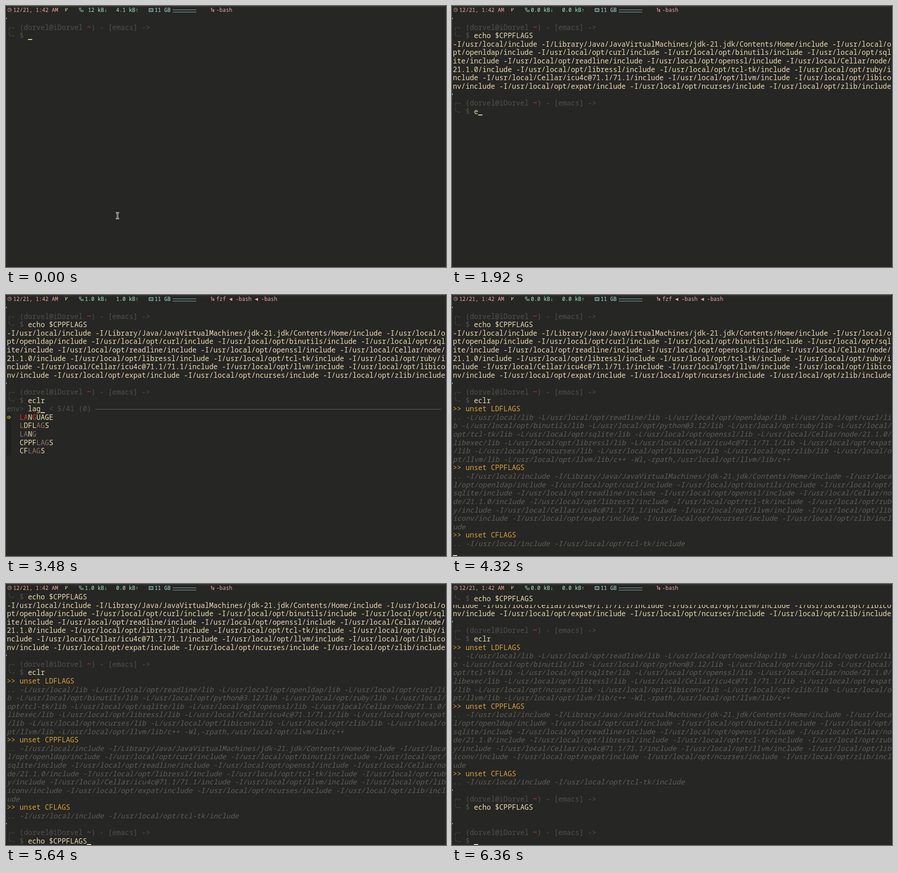
An HTML page with a canvas that plays this animation: 971x577 px, repeating every 6520 ms.

```html
<!DOCTYPE html>
<html lang="en">
<head>
<meta charset="utf-8">
<title>Terminal session</title>
<style>
  html, body { margin: 0; width: 100%; height: 100%; overflow: hidden; background: #262624; }
  canvas { display: block; }
</style>
</head>
<body>
<canvas id="stage" width="971" height="577"></canvas>
<script>
const ctx = document.getElementById('stage').getContext('2d');
const W = 971, H = 577, LOOP = 6520;
const COLS = 104, ROWS = 30, CW = 9.3, RH = 18.61, LEFT = 2, TOP = 28.4;
const MONO = '"Noto Sans Mono", "DejaVu Sans Mono", monospace';
const C = {
  bg: '#262624', edge: '#3a3a38', text: '#ebdbb2', dim: '#51504d', note: '#5f5e5a', orange: '#d8a038',
  red: '#d23a2e', hit: '#8c7468', yellow: '#c9b13c', gutter: '#20201e',
  clock: '#f2aaa4', branch: '#e9e7a4', net: '#a4efc4', mem: '#a6eae6', graph: '#86b4b4', job: '#efa3bb'
};

// ---- text content ----
const flags = (opt, dir, names) => names.split(' ').map(n =>
  opt + (n[0] === '/' ? n : '/usr/local' + (n === '.' ? '' : /^Cellar/.test(n) ? '/' + n : '/opt/' + n)) + '/' + dir
).join(' ');
const CPP = flags('-I', 'include', '. /Library/Java/JavaVirtualMachines/jdk-21.jdk/Contents/Home ' +
  'openldap curl binutils sqlite readline openssl Cellar/node/21.1.0 libressl tcl-tk ruby ' +
  'Cellar/icu4c@71.1/71.1 llvm libiconv expat ncurses zlib');
const LD = flags('-L', 'lib', '. readline openldap curl binutils python@3.12 ruby tcl-tk sqlite openssl ' +
  'Cellar/node/21.1.0/libexec libressl Cellar/icu4c@71.1/71.1 expat ncurses libiconv zlib llvm') +
  ' -L/usr/local/opt/llvm/lib/c++ -Wl,-rpath,/usr/local/opt/llvm/lib/c++';
const CF = flags('-I', 'include', '. tcl-tk');
const ECHO = 'echo $CPPFLAGS';
const VARS = ['LANGUAGE', 'LDFLAGS', 'HISTSIZE', 'LANG', 'SHELL', 'CPPFLAGS', 'JAVA_HOME',
  'CFLAGS', 'EDITOR', 'LC_ALL', 'HISTCONTROL', 'LOGNAME'];
const FOUND = { '': 41, l: 19, la: 7, lag: 5, lags: 3 };

// Last value whose start time has passed
const at = (t, steps) => steps.reduce((v, [from, val]) => t >= from ? val : v, steps[0][1]);

const firstCmd = [[0, ''], [120, ECHO]];
const secondCmd = [[0, ''], [1880, 'e'], [2000, 'ec'], [2080, 'ecl'], [2160, 'eclr']];
const lastCmd = [[0, ''], [5200, 'eclr'], [5280, ECHO]];
const query = [[0, ''], [3040, 'l'], [3280, 'la'], [3440, 'lag'], [3560, 'lags']];
const picks = [[0, 0], [3760, 1], [3880, 2], [4000, 3]];
const down = [[0, '12'], [560, '1.0'], [1240, '0.0'], [3080, '1.0'], [3880, '0.0'], [4840, '1.0'], [6280, '0.0']];
const up = [[0, '4.1'], [560, '0.0'], [3080, '1.0'], [3880, '0.0']];
const job = [[0, '-bash'], [2440, 'fzf ◄ -bash ◄ -bash'], [4760, '-bash']];

// ---- screen model: lines of [column, text, colour, italic] parts ----
function match(word, q) {
  const hits = [];
  let from = 0;
  for (const ch of q.toUpperCase()) {
    const i = word.indexOf(ch, from);
    if (i < 0) return null;
    hits.push(i);
    from = i + 1;
  }
  return hits;
}

function buildScreen(t) {
  const lines = [];
  let cursor = [0, 0];
  const add = (parts, extra) => lines.push({ parts, ...extra });
  const newline = () => { cursor = [lines.length, 0]; };
  const wrap = (s, color, italic) => {
    for (let i = 0; i < s.length; i += COLS) add([[0, s.slice(i, i + COLS), color, italic]]);
    newline();
  };
  const prompt = cmd => {
    add([], { tick: true });
    add([[1, '-', C.dim], [3, '(dorvel@iDorvel', C.dim], [19, '~', C.red],
      [20, ') - [emacs] ->', C.dim]], { corner: 1 });
    add([[1, '-', C.dim], [3, '$', C.dim], [5, cmd, C.text]], { corner: -1 });
    cursor = [lines.length - 1, 5 + cmd.length];
  };
  const unset = (name, value) => {
    add([[0, '>> unset ' + name, C.orange]]);
    wrap('.. ' + value, C.note, true);
  };
  const picker = () => {
    const q = at(t, query), n = at(t, picks), end = 5 + q.length;
    const info = `< ${FOUND[q]}/41 (${n})`;
    add([[0, 'env>', C.dim], [5, q, C.text], [end + 2, info, C.dim]], { rule: end + 3 + info.length });
    cursor = [lines.length - 1, end];
    if (t < 2400) return;
    const rows = VARS.filter(v => match(v, q)).slice(0, 9), here = Math.min(n, rows.length - 1);
    rows.forEach((word, i) => {
      const hits = match(word, q), parts = [[3, word, C.text]];
      if (i < n) parts.push([1, '>', C.orange]);
      hits.forEach(h => parts.push([3 + h, word[h], i === here ? C.red : C.hit]));
      // Plain letters and matched letters must not overlap
      parts[0][1] = [...word].map((ch, k) => hits.includes(k) ? ' ' : ch).join('');
      add(parts, { gutter: true, pointer: i === here, bar: FOUND[q] > 9 && i < 2 });
    });
  };

  prompt(at(t, firstCmd));
  if (t >= 440) newline();
  if (t >= 480) wrap(CPP, C.text);
  if (t >= 560) prompt(at(t, secondCmd));
  if (t >= 2280) newline();
  if (t >= 2320 && t < 4240) picker();
  if (t >= 4240) unset('LDFLAGS', LD);
  if (t >= 4280) unset('CPPFLAGS', CPP);
  if (t >= 4320) unset('CFLAGS', CF);
  if (t >= 4360) prompt(at(t, lastCmd));
  if (t >= 5760) { add([]); newline(); }
  if (t >= 5840) prompt('');
  return { lines, cursor, scroll: Math.max(0, cursor[0] - ROWS + 1) };
}

// ---- drawing ----
function text(s, x, y, color, size = 15.5, italic = false, align = 'left') {
  ctx.font = `${italic ? 'italic ' : ''}${size}px ${MONO}`;
  ctx.textAlign = align;
  ctx.fillStyle = color;
  ctx.fillText(s, x, y);
}

function box(x, y, w, h, color) {
  ctx.fillStyle = color;
  ctx.fillRect(x, y, w, h);
}

function stroke(d, color, width = 1) {
  ctx.strokeStyle = color;
  ctx.lineWidth = width;
  ctx.stroke(new Path2D(d));
}

function drawLine(line, y) {
  if (line.gutter) box(LEFT, y - RH / 2, CW, RH + 0.3, C.gutter);
  for (const [col, s, color, italic] of line.parts) text(s, LEFT + col * CW, y + 5.5, color, 15.5, italic);
  if (line.tick) {
    ctx.fillStyle = '#a9d6df';
    ctx.fill(new Path2D(`M0 ${y - 3}l2 2l-2 2z`));
  }
  if (line.corner) {
    const s = line.corner;
    stroke(`M11.5 ${y}H10Q7 ${y} 7 ${y + 3 * s}V${y + 8 * s}`, C.dim);
  }
  if (line.rule) box(LEFT + line.rule * CW, Math.round(y), 960 - LEFT - line.rule * CW, 1, '#605e56');
  if (line.pointer) stroke(`M2 ${y - 1.5}H8M2 ${y + 1.5}H8M6 ${y - 4}L10.5 ${y}L6 ${y + 4}`, C.yellow, 1.1);
  if (line.bar) box(964, y - RH / 2, 1, RH, C.dim);
}

function statusBar(t) {
  const label = (s, x, color, align) => text(s, x, 13, color, 11.8, false, align);
  box(0, 0, W, 19, C.bg);
  box(2, 1, W - 4, 1, C.edge);
  stroke('M12 8.5A4 4 0 1 1 4 8.5A4 4 0 1 1 12 8.5M8 6V8.5H10.5', C.clock, 0.9);
  label('12/21, 1:42 AM', 16, C.clock);
  stroke('M131.5 5V12M131.5 10Q135 9.5 135 6M130.5 5.5H132.5M134 5.5H136', C.branch);
  stroke('M161.5 4.5H165.5V7.5H161.5ZM166.5 9.5H170.5V12.5H166.5ZM163.5 7.5V11H166.5', C.net, 0.8);
  label(at(t, down) + ' kB↓', 223.5, C.net, 'right');
  label(at(t, up) + ' kB↑', 292.5, C.net, 'right');
  stroke('M315.5 5.5H324.5V12.5H315.5ZM318 5.5V12.5M322 5.5V12.5', C.mem, 0.9);
  label('11 GB', 328, C.mem);
  box(368, 8, 52, 1, C.graph);
  box(368, 13, 52, 1, C.graph);
  stroke('M452.5 4.5H454.5V6.5H452.5ZM453.5 6.5V11.5H457M453.5 8.5H457M457 7.5H459V9.5H457ZM457 10.5H459V12.5H457Z',
    C.job, 0.8);
  label(at(t, job), 464, C.job);
}

function mousePointer(x, y) {
  const d = `M${x - 3.5} ${y - 6.5}Q${x} ${y - 6.5} ${x} ${y - 4}V${y + 4}Q${x} ${y + 6.5} ${x - 3.5} ${y + 6.5}` +
    `M${x + 3.5} ${y - 6.5}Q${x} ${y - 6.5} ${x} ${y - 4}M${x} ${y + 4}Q${x} ${y + 6.5} ${x + 3.5} ${y + 6.5}` +
    `M${x - 2} ${y}H${x + 2}`;
  stroke(d, '#f0f0f0', 2.8);
  stroke(d, C.bg, 1);
}

function draw(t) {
  const { lines, cursor, scroll } = buildScreen(t);
  const rowY = row => TOP + (row - scroll) * RH;
  box(0, 0, W, H, C.bg);
  lines.forEach((line, i) => {
    if (i >= scroll) drawLine(line, rowY(i));
  });
  box(LEFT + cursor[1] * CW, Math.ceil(rowY(cursor[0]) + 6.7), CW, 2, C.text);
  if (scroll > 2) {
    box(0, 18, W, 28, C.bg);
    drawLine(lines[2], 32);
  }
  statusBar(t);
  if (t < 120) mousePointer(246, 463.5);
}

const start = performance.now();
function tick() {
  draw((performance.now() - start) % LOOP);
  requestAnimationFrame(tick);
}
tick();
</script>
</body>
</html>
```
